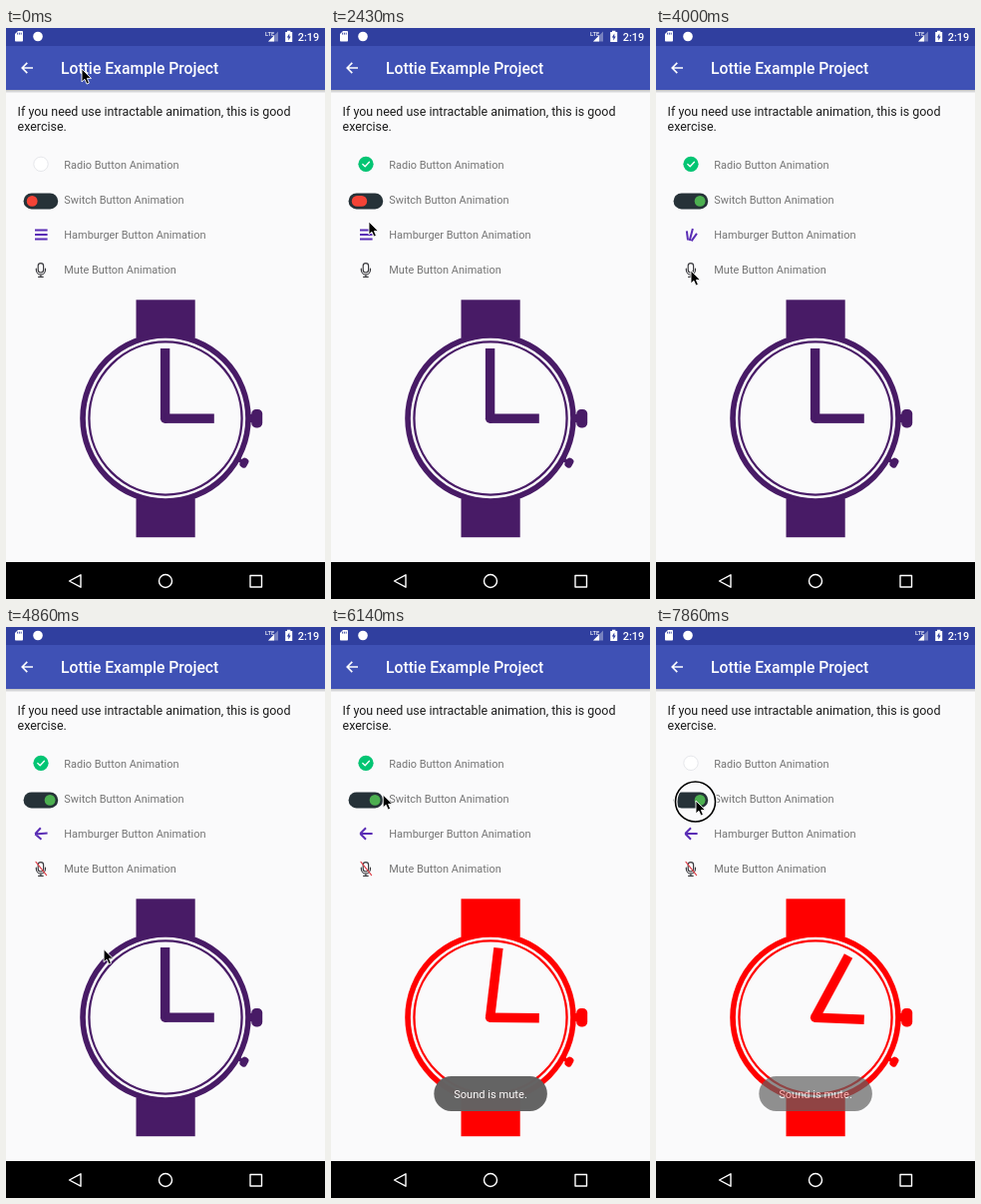
An HTML page that plays this animation: 320x572 px, repeating every 8000 ms.

```html
<!DOCTYPE html>
<html lang="en">
<head>
<meta charset="utf-8">
<title>Interactive animation exercise</title>
<style>
  html, body { margin: 0; width: 100%; height: 100%; overflow: hidden; background: #fafafb; }
  svg { display: block; width: 100vw; height: 100vh; font-family: Roboto, sans-serif; }
  .label { font-size: 10.95px; fill: #747474; }
  .body { font-size: 12.46px; fill: #1c1c1c; }
  .line { fill: none; stroke-linecap: round; stroke-linejoin: round; }
</style>
</head>
<body>
<svg viewBox="0 0 320 572">
  <defs>
    <linearGradient id="shade" x2="0" y2="1">
      <stop stop-color="#000" stop-opacity=".24"/>
      <stop offset="1" stop-color="#000" stop-opacity="0"/>
    </linearGradient>
  </defs>
  <rect width="320" height="572" fill="#fafafb"/>

  <!-- bars -->
  <rect y="62" width="320" height="3.5" fill="url(#shade)"/>
  <rect width="320" height="62" fill="#3f51b5"/>
  <rect width="320" height="18" fill="#303f9f"/>
  <rect y="535" width="320" height="37"/>
  <g fill="#fff">
    <path d="M12 3H16.2Q17 3 17 3.8V12.6Q17 13.5 16.2 13.5H9.8Q9 13.5 9 12.6V6Z"/>
    <path d="M11.6 4.7V6.6M13.4 4.7V6.6M15.2 4.7V6.6" stroke="#303f9f" stroke-width=".9"/>
    <circle cx="32" cy="8.5" r="4.8"/>
    <text x="260" y="8" font-size="5.8" font-weight="500">LTE</text>
    <path d="M273 3.5V13.5H263Z" opacity=".35"/>
    <path d="M269 7.5V13.5H263Z"/>
    <path d="M282 2.8H285.4V4H287.2V14H280.2V4H282Z"/>
    <path d="M284.3 5.5L281.8 9.6H283.3V12.6L285.7 8.4H284.3Z" fill="#303f9f"/>
    <text x="292.7" y="13" font-size="10.9" font-weight="500">2:19</text>
    <text x="55" y="46.1" font-size="15.7" font-weight="500">Lottie Example Project</text>
  </g>
  <path d="M27 40H16.5M21.3 34.9L16.2 40L21.3 45.1" fill="none" stroke="#fff" stroke-width="1.6"/>
  <g class="line" stroke="#fff" stroke-width="1.4">
    <path d="M63.5 554L75 547.8V560.2Z"/>
    <circle cx="160" cy="554" r="6.5"/>
    <rect x="245" y="548.5" width="11.5" height="11.5"/>
  </g>

  <text class="body" x="11.6" y="87.8">If you need use intractable animation, this is good</text>
  <text class="body" x="11.6" y="102.5">exercise.</text>
  <g class="label">
    <text x="58.3" y="140.6">Radio Button Animation</text>
    <text x="58.3" y="176">Switch Button Animation</text>
    <text x="58.3" y="211.2">Hamburger Button Animation</text>
    <text x="58.3" y="246.4">Mute Button Animation</text>
  </g>

  <!-- radio -->
  <circle cx="35" cy="136.3" r="7.2" fill="#fff" stroke="#e2e4e8" stroke-width=".9"/>
  <circle id="disc" cx="35" cy="136.3" fill="#03c573"/>
  <path id="check" class="line" d="M31.8 136.5L34.2 138.8L38.4 134.3" stroke="#fff" stroke-width="1.3" pathLength="1"/>

  <!-- switch -->
  <rect x="17.6" y="165.4" width="34.6" height="16" rx="8" fill="#263238"/>
  <rect id="knob" y="168" height="10.8" rx="5.4"/>

  <path id="menu" fill="none" stroke="#5a2db5" stroke-width="2"/>

  <!-- microphone -->
  <g class="line" stroke="#3c3c40" stroke-width="1.2">
    <rect x="32.2" y="235.6" width="5.4" height="9.4" rx="2.7"/>
    <path d="M30.3 241.2V242.2A4.6 4.8 0 0 0 39.5 242.2V241.2M34.9 247V249.2M32.6 249.3H37.2"/>
  </g>
  <path id="slash" class="line" d="M30 235.3L40.6 248.6" stroke="#e0474f" stroke-width="1.2" pathLength="1"/>

  <!-- watch -->
  <g id="watch">
    <rect x="130.5" y="272.3" width="59.2" height="38.5"/>
    <rect x="130.5" y="471.2" width="59.2" height="39"/>
    <circle cx="160" cy="391" r="83" fill="#fafafb" stroke="currentColor" stroke-width="5.6"/>
    <circle cx="160" cy="391" r="76.6" fill="none" stroke="currentColor" stroke-width="2.3"/>
    <rect x="244" y="387" width="6" height="8"/>
    <rect x="246.2" y="382" width="11" height="18.4" rx="4.6"/>
    <g transform="translate(160 391) rotate(29.5)">
      <rect x="84" y="-2" width="6" height="4"/>
      <rect x="87" y="-5" width="7.4" height="10" rx="3.3"/>
    </g>
    <circle cx="159.6" cy="391.2" r="4.7"/>
    <rect id="minute" x="154.9" y="321" width="9.4" height="70.2"/>
    <rect id="hour" x="159.6" y="386.5" width="49.2" height="9.4"/>
  </g>

  <g id="toast">
    <rect x="103.3" y="450" width="113.6" height="35" rx="17.5" fill="#626262"/>
    <text x="160" y="471.8" font-size="11.1" fill="#fff" text-anchor="middle">Sound is mute.</text>
  </g>

  <g id="ring" fill="none">
    <circle r="20" stroke="#fff" stroke-width="4"/>
    <circle r="20" stroke="#000" stroke-width="1.6"/>
  </g>
  <path id="pointer" d="M0 0V13L3 10.3L5 15.1L7.4 14.1L5.4 9.4H9.5Z" stroke="#fff" stroke-width=".9"/>
</svg>
<script>
const LOOP = 8000, STEP = 1000 / 7;
const el = Object.fromEntries([...document.querySelectorAll('svg [id]')].map(e => [e.id, e]));
const set = (name, attrs) => { for (const k in attrs) el[name].setAttribute(k, attrs[k]); };
const mix = (a, b, u) => a + (b - a) * u;
const linear = (t, a, b) => Math.min(1, Math.max(0, (t - a) / (b - a)));
const ease = (t, a, b) => { const u = linear(t, a, b); return u * u * (3 - 2 * u); };

const PATH = [
  [0, 76, 41], [860, 38, 141], [1400, 38, 141], [1800, 37, 172], [2150, 37, 172],
  [2430, 38, 194], [2560, 37, 205], [3100, 37, 205], [3700, 35, 243], [4350, 35, 243],
  [5000, 107, 334], [5700, 107, 334], [6300, 41, 134], [7050, 41, 134], [7600, 40, 174], [8000, 40, 174]
];
const CLICKS = [1140, 1860, 2570, 3860, 5290, 6430, 7860];

function pointerAt(t) {
  let i = 1;
  while (i < PATH.length - 1 && PATH[i][0] < t) i++;
  const [t0, x0, y0] = PATH[i - 1], [t1, x1, y1] = PATH[i], u = ease(t, t0, t1);
  return [mix(x0, x1, u), mix(y0, y1, u)];
}

function drawStroke(name, u) {
  set(name, { 'stroke-dasharray': `${u} 2`, visibility: u > 0 ? 'visible' : 'hidden' });
}

// Three bars become an arrow while the icon makes a half turn.
function drawMenu(u) {
  const bar = s => `M${mix(-6.3, 0.3, u)} ${s * mix(4.4, 5.8, u)}L${mix(6.3, 6, u)} ${s * mix(4.4, 0, u)}`;
  set('menu', {
    d: bar(-1) + 'M-6.3 0H6.3' + bar(1),
    transform: `translate(35.3 207) rotate(${180 * u})`
  });
}

function drawSwitch(t) {
  const left = mix(20.8, 38.7, ease(t, 2500, 3050));
  const right = mix(31.6, 49.5, ease(t, 2270, 2750));
  const g = ease(t, 2480, 2900);
  const rgb = [[244, 76], [67, 175], [54, 80]].map(([a, b]) => Math.round(mix(a, b, g)));
  set('knob', { x: left, width: right - left, fill: `rgb(${rgb})` });
}

function render(t) {
  const on = ease(t, 1280, 1600) - ease(t, 6500, 6800);
  set('disc', { r: 7.6 * on });
  drawStroke('check', ease(t, 1500, 1850) - ease(t, 6450, 6650));
  drawSwitch(t);
  drawMenu(ease(t, 2700, 5050));
  drawStroke('slash', ease(t, 4020, 4700));

  const color = t < 5400 ? '#481b66' : '#ff0000';
  set('watch', { fill: color, color });
  const angle = Math.max(0, t - 5600) * 0.0126;
  set('minute', { transform: `rotate(${angle} 159.6 391.2)` });
  set('hour', { transform: `rotate(${angle / 12} 159.6 391.2)` });

  set('toast', { opacity: 0.98 * (linear(t, 5650, 5950) - linear(t, 7700, 8250)) });

  const [x, y] = pointerAt(t);
  set('pointer', { transform: `translate(${x} ${y})` });
  const down = CLICKS.some(c => t >= c - 5 && t < c + 135);
  set('ring', { transform: `translate(${x - 0.5} ${y + 1})`, visibility: down ? 'visible' : 'hidden' });
}

const start = performance.now();
function tick() {
  const t = (performance.now() - start) % LOOP;
  render(Math.floor((t + 4) / STEP) * STEP % LOOP);
  requestAnimationFrame(tick);
}
tick();
</script>
</body>
</html>
```
